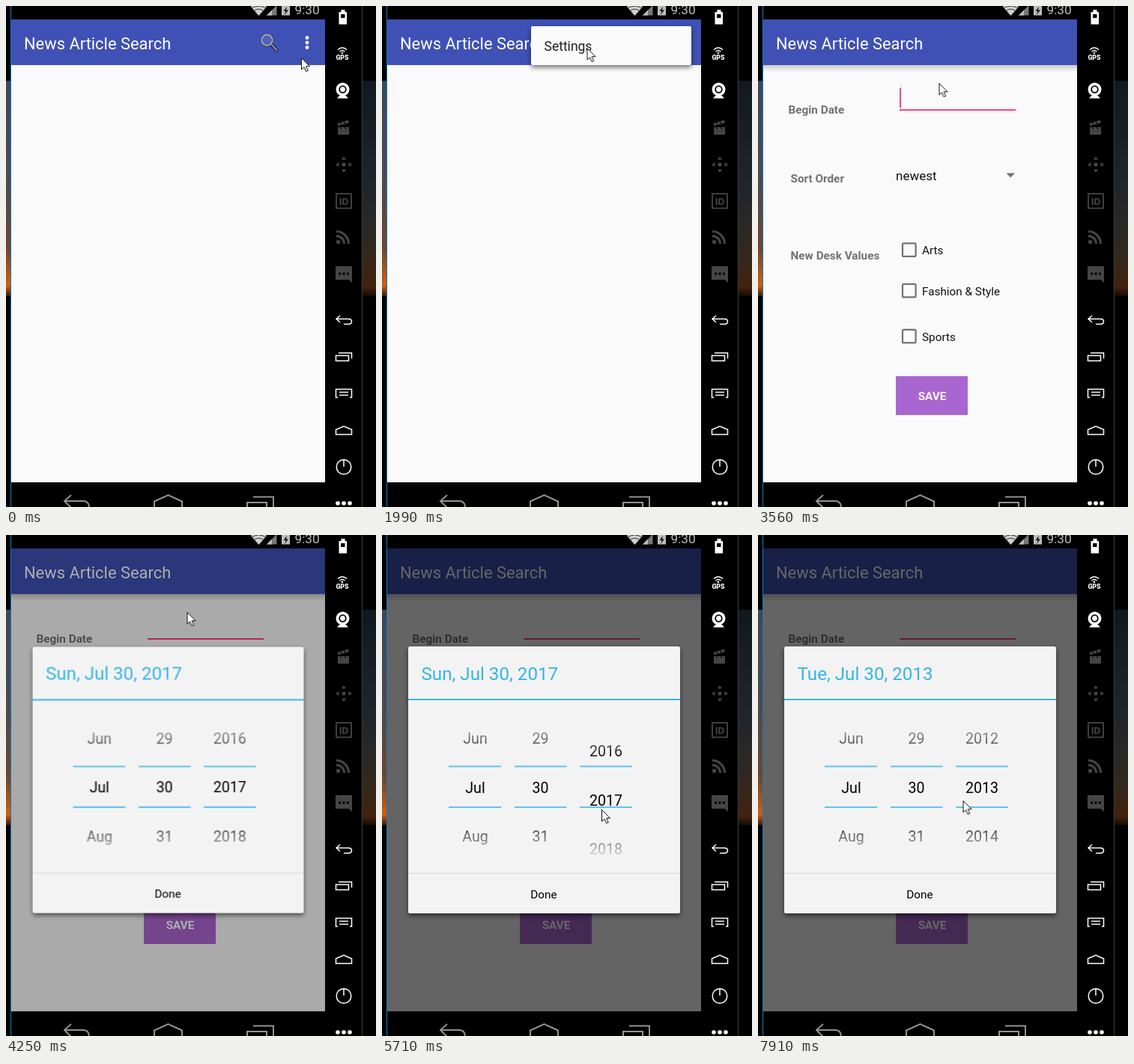
An HTML page that plays this animation: 494x670 px, repeating every 8 s.

```html
<!DOCTYPE html>
<html lang="en">
<head>
<meta charset="utf-8">
<title>News Article Search</title>
<style>
html, body { margin: 0; width: 100%; height: 100%; overflow: hidden; background: #000; }
svg { display: block; width: 100%; height: 100%; font-family: Roboto, sans-serif; }
.mid { text-anchor: middle; }
.label { font-size: 15.3px; font-weight: 700; fill: #737373; }
.option { font-size: 15.3px; fill: #111; }
.wheel { font-size: 19.6px; text-anchor: middle; }
.line { fill: none; stroke: #fff; stroke-width: 1.5; }
.nav { fill: none; stroke: #929292; stroke-width: 2; }

/* Screen capture: every pose is held until the next one */
.anim { animation: 8s step-end infinite; }
#cursor { animation-name: cursor; }
#ripple { animation-name: ripple; opacity: 0; }
#menu { animation-name: menu; opacity: 0; transform-origin: 413px 27px; }
#press { animation-name: press; opacity: 0; }
#shade { animation-name: shade; opacity: 0; }
#form { animation-name: form; opacity: 0; transform-origin: 216px 318px; }
#caret { animation-name: caret; }
#dim { animation-name: dim; opacity: 0; }
#dialog { animation-name: dialog; opacity: 0; transform-origin: 216px 327.5px; }
#years { animation-name: years; }
#date { animation-name: date; }

@keyframes cursor {
  0% { transform: translate(394px, 69px); }
  1.5% { transform: translate(395px, 67px); }
  3.32% { transform: translate(396px, 65px); }
  19.5% { transform: translate(365px, 64px); }
  21.3% { transform: translate(325px, 60px); }
  23.1% { transform: translate(290px, 57px); }
  24.87% { transform: translate(273.5px, 56px); }
  39.5% { transform: translate(262px, 70px); }
  41.25% { transform: translate(246px, 84px); }
  43% { transform: translate(243px, 95px); }
  44.5% { transform: translate(241.5px, 103px); }
  58.6% { transform: translate(236px, 125px); }
  60.4% { transform: translate(230px, 170px); }
  62.1% { transform: translate(245px, 235px); }
  63.9% { transform: translate(270px, 285px); }
  65.6% { transform: translate(282px, 307px); }
  69.5% { transform: translate(287px, 338px); }
  71.37% { transform: translate(293px, 367px); }
  72.87% { transform: translate(296px, 395px); }
  74.6% { transform: translate(297px, 403px); }
  78% { transform: translate(296px, 385px); }
  79.7% { transform: translate(292px, 350px); }
  81.37% { transform: translate(285px, 310px); }
  84.87% { transform: translate(286px, 322px); }
  86.65% { transform: translate(290px, 360px); }
  88.4% { transform: translate(293px, 400px); }
  90.15% { transform: translate(294px, 408px); }
  93.7% { transform: translate(292px, 385px); }
  95.5% { transform: translate(289px, 358px); }
  97.25% { transform: translate(286px, 338px); }
  98.87%, 100% { transform: translate(273.5px, 355px); }
}
@keyframes ripple {
  0% { opacity: 0; }
  5.14% { opacity: .12; }
  6.96% { opacity: .22; }
  12.4% { opacity: .1; }
  14.25%, 100% { opacity: 0; }
}
@keyframes menu {
  0% { opacity: 0; transform: scale(.8); }
  10.6% { opacity: .35; transform: scale(.93); }
  12.4% { opacity: .8; transform: scale(.98); }
  14.25% { opacity: 1; transform: none; }
  30.5% { opacity: .4; transform: none; }
  32.5%, 100% { opacity: 0; }
}
@keyframes press {
  0% { opacity: 0; }
  28.75% { opacity: .1; }
  32.5%, 100% { opacity: 0; }
}
@keyframes shade {
  0% { opacity: 0; }
  30.5% { opacity: .03; }
  32.5% { opacity: .07; }
  34.2%, 100% { opacity: .12; }
}
@keyframes form {
  0% { opacity: 0; transform: scale(.85); }
  30.5% { opacity: .1; transform: scale(.855); }
  32.5% { opacity: .42; transform: scale(.884); }
  34.25% { opacity: .8; transform: scale(.95); }
  35.9% { opacity: 1; transform: scale(.988); }
  37.6%, 100% { opacity: 1; transform: none; }
}
@keyframes caret {
  0% { opacity: 1; }
  39.5% { opacity: 0; }
  43% { opacity: 1; }
  53.12%, 100% { opacity: 0; }
}
@keyframes dim {
  0% { opacity: 0; }
  53.12% { opacity: .32; }
  55%, 100% { opacity: .6; }
}
@keyframes dialog {
  0% { opacity: 0; transform: scale(.997); }
  53.12% { opacity: 1; transform: scale(.997); }
  55%, 100% { opacity: 1; transform: none; }
}
@keyframes years {
  0% { transform: none; }
  71.37% { transform: translateY(17px); }
  72.87% { transform: translateY(45px); }
  74.6% { transform: translateY(58px); }
  76.3% { transform: translateY(63px); }
  78% { transform: translateY(65.5px); }
  86.65% { transform: translateY(95px); }
  88.4% { transform: translateY(150px); }
  90.15% { transform: translateY(195px); }
  91.9% { transform: translateY(232px); }
  93.7% { transform: translateY(252px); }
  95.5% { transform: translateY(260px); }
  97.25%, 100% { transform: translateY(262px); }
}
@keyframes date {
  0% { transform: none; }
  72.87% { transform: translateY(-40px); }
  88.4% { transform: translateY(-80px); }
  90.15% { transform: translateY(-120px); }
  91.9%, 100% { transform: translateY(-160px); }
}
</style>
</head>
<body>
<svg viewBox="0 0 494 670">
  <defs>
    <linearGradient id="skyLeft" x2="0" y2="1">
      <stop stop-color="#3b475c"/><stop offset=".45" stop-color="#4a4a50"/>
      <stop offset=".78" stop-color="#6b4630"/><stop offset=".95" stop-color="#d0600f"/>
      <stop offset="1" stop-color="#3a1c08"/>
    </linearGradient>
    <linearGradient id="skyRight" x2="0" y2="1">
      <stop stop-color="#101820"/><stop offset=".5" stop-color="#1f262d"/>
      <stop offset=".8" stop-color="#33291f"/><stop offset=".96" stop-color="#42220f"/>
      <stop offset="1" stop-color="#140a05"/>
    </linearGradient>
    <linearGradient id="barShadow" x2="0" y2="1">
      <stop stop-opacity=".2"/><stop offset="1" stop-opacity=".01"/>
    </linearGradient>
    <linearGradient id="fade" gradientUnits="userSpaceOnUse" x1="0" x2="0" y1="240" y2="436">
      <stop stop-color="#000"/><stop offset=".306" stop-color="#fff"/>
      <stop offset=".694" stop-color="#fff"/><stop offset="1" stop-color="#000"/>
    </linearGradient>
    <mask id="wheelMask" maskUnits="userSpaceOnUse" x="40" y="236" width="350" height="204" style="color-interpolation:sRGB;mask-type:luminance">
      <rect x="40" y="240" width="350" height="196" fill="url(#fade)"/>
    </mask>
    <clipPath id="dateClip"><rect x="45" y="168" width="340" height="38"/></clipPath>
    <clipPath id="screenClip"><rect x="7" y="18" width="419" height="619"/></clipPath>
    <filter id="shadow" x="-10%" y="-20%" width="120%" height="150%">
      <feDropShadow dx="0" dy="3" stdDeviation="3" flood-opacity=".55"/>
    </filter>
    <g id="bar">
      <rect x="7" y="18" width="419" height="61" fill="#3f51b5"/>
      <text x="24" y="57.5" font-size="21.9" fill="#fff">News Article Search</text>
    </g>
    <rect id="box" x="193" y="-8.7" width="17.6" height="17.6" rx="1.5" fill="none" stroke="#737373" stroke-width="2.2"/>
  </defs>

  <!-- Desktop and emulator frame -->
  <rect width="494" height="670"/>
  <rect y="100" width="6" height="288" fill="url(#skyLeft)"/>
  <rect x="476" y="100" width="18" height="288" fill="url(#skyRight)"/>
  <path d="M6.5 0V670" stroke="#1b78c4"/>
  <path d="M475.5 0V670" stroke="#3c3c3c"/>

  <!-- Status bar -->
  <g fill="#bdbdbd">
    <path d="M327 1Q337.500-6 348 1L337.500 13Z" fill="#d0d0d0"/>
    <path d="M328 3Q337.500-3 347 3M331 6.500Q337.500 2 344 6.500" fill="none" stroke="#333"/>
    <path d="M348 12.500 361.500-1V12.500Z" fill="#777"/>
    <path d="M348 12.500 355 5.500V12.500Z"/>
    <path d="M368 0H379V12.500H368Z"/>
    <path d="M375 1 370.500 7H373.500L372 12 377 5.500H374Z" fill="#111"/>
    <text x="385.500" y="11" font-size="17.200">9:30</text>
  </g>

  <!-- Phone navigation -->
  <g class="nav">
    <path d="M87 654 78 662 87 671M78 662H103Q111 662 111 671"/>
    <path d="M198 671V662.500L216.500 654 235 662.500V671"/>
    <path d="M322 671V664H348V671M330 656.500H357V671"/>
  </g>

  <!-- Emulator toolbar -->
  <g fill="#fff">
    <path d="M447.500 5H452.500V8H455V24.500H444.500V8H447.500Z"/>
    <path d="M447 11H452.500V16H447Z" fill="#000"/>
    <path class="line" d="M443 58.500Q449 53 455 58.500M445.500 61Q449 58 452.500 61"/>
    <circle cx="449" cy="62.800" r="1.300"/>
    <text class="mid" x="449" y="72" font-size="8.800" font-weight="900">GPS</text>
    <circle cx="449.500" cy="111.500" r="9"/>
    <circle cx="449.500" cy="111.500" r="4.300" fill="none" stroke="#000" stroke-width="1.800"/>
    <path d="M445 120H454L457 123.500H442Z"/>
    <circle cx="443" cy="665" r="2.800"/>
    <circle cx="451" cy="665" r="2.800"/>
    <circle cx="459" cy="665" r="2.800"/>
  </g>
  <g fill="#454545">
    <path d="M443 162H458V172H443ZM442.500 157 457 152.500 458 156 443.500 160.500Z"/>
    <path d="M446 155 448 159M451 153.500 453 157.500M446 162 448 165M452 162 454 165" stroke="#000"/>
    <circle cx="451" cy="212" r="2.600"/>
    <path d="M451 201 454 205.500H448ZM451 223 448 218.500H454ZM440 212 444.500 209V215ZM462 212 457.500 215V209Z"/>
    <rect x="441" y="251" width="20" height="19.500" fill="none" stroke="#454545" stroke-width="1.800"/>
    <text class="mid" x="451" y="266" font-size="13.500" font-weight="700">ID</text>
    <circle cx="443.500" cy="315.500" r="2.700"/>
    <path d="M441 307.500A10.500 10.500 0 0 1 451.500 318M441 301.500A16.500 16.500 0 0 1 457.500 318" fill="none" stroke="#454545" stroke-width="3.200"/>
    <path d="M440 348H462V370L457.500 366H440Z"/>
    <path d="M444 356.500H447V359.500H444ZM449.500 356.500H452.500V359.500H449.500ZM455 356.500H458V359.500H455Z" fill="#000"/>
  </g>
  <g class="line">
    <path d="M446 414 441 418.500 446 423M441 418.500H457Q461.500 418.500 461.500 422 461.500 425.500 457 425.500H451"/>
    <path d="M440.500 467.500H457.500V474.500H440.500ZM444 464H461.500V471.500"/>
    <path d="M443 523.500H440.500V512.500H461.500V523.500H459M445 516.500H457M445 520.500H457"/>
    <path d="M440.500 573V566.500L451 562 461.500 566.500V573Z"/>
    <circle cx="451" cy="616.500" r="9.800"/><path d="M451 606V616"/>
  </g>

  <g clip-path="url(#screenClip)">
    <!-- Main screen -->
    <rect x="7" y="18" width="419" height="619" fill="#fafafa"/>
    <use href="#bar"/>
    <g fill="none">
      <path d="M354.500 51.500 361.500 59" stroke="#252b55" stroke-width="5" stroke-linecap="round"/>
      <circle cx="348.500" cy="45.500" r="7.300" stroke="#303766" stroke-width="3.600"/>
      <circle cx="348.500" cy="45.500" r="7.300" fill="#5262b4" stroke="#a3a7bc" stroke-width="1.900"/>
      <path d="M354.500 51.500 361.500 59" stroke="#80859e" stroke-width="2.400" stroke-linecap="round"/>
    </g>
    <g fill="#fff">
      <circle cx="402" cy="42.500" r="2.400"/>
      <circle cx="402" cy="49" r="2.400"/>
      <circle cx="402" cy="55.500" r="2.400"/>
    </g>
    <circle id="ripple" class="anim" cx="402" cy="49" r="26" fill="#fff"/>
    <g id="menu" class="anim">
      <rect x="199" y="27" width="214" height="52" rx="2" fill="#fafafa" filter="url(#shadow)"/>
      <rect id="press" class="anim" x="199" y="27" width="214" height="52"/>
      <text x="216.500" y="60" font-size="17.500" fill="#212121">Settings</text>
    </g>
    <rect id="shade" class="anim" x="7" y="18" width="419" height="619"/>

    <!-- Settings screen -->
    <g id="form" class="anim">
      <rect x="7" y="79" width="419" height="558" fill="#fafafa"/>
      <rect x="7" y="79" width="419" height="9" fill="url(#barShadow)"/>
      <use href="#bar"/>
      <g class="label">
        <text x="40.500" y="144">Begin Date</text>
        <text x="43.500" y="235.500">Sort Order</text>
        <text x="43.500" y="339">New Desk Values</text>
      </g>
      <path d="M189 139H344" stroke="#ff4081" stroke-width="2.200"/>
      <path id="caret" class="anim" d="M190 109.500V136" stroke="#ff4081" stroke-width="2"/>
      <text x="184" y="232.500" font-size="17" fill="#111">newest</text>
      <path d="M331.500 223.500H343L337.250 229.500Z" fill="#737373"/>
      <use href="#box" y="326"/>
      <use href="#box" y="380.500"/>
      <use href="#box" y="441.500"/>
      <g class="option">
        <text x="219" y="332">Arts</text>
        <text x="219" y="386.500">Fashion &amp; Style</text>
        <text x="219" y="447.500">Sports</text>
      </g>
      <rect x="184" y="495" width="96" height="52" fill="#aa66d0"/>
      <text class="mid" x="232.500" y="527" font-size="15.300" font-weight="700" fill="#fff">SAVE</text>
    </g>
    <rect id="dim" class="anim" x="7" y="18" width="419" height="619"/>

    <!-- Date picker -->
    <g id="dialog" class="anim">
      <rect x="35" y="149" width="363" height="357" rx="2.500" fill="#f3f3f3" filter="url(#shadow)"/>
      <g clip-path="url(#dateClip)">
        <g id="date" class="anim" font-size="24.200" fill="#33b5e5">
          <text x="52.500" y="193.500">Sun, Jul 30, 2017</text>
          <text x="52.500" y="233.500">Sat, Jul 30, 2016</text>
          <text x="52.500" y="273.500">Thu, Jul 30, 2015</text>
          <text x="52.500" y="313.500">Wed, Jul 30, 2014</text>
          <text x="52.500" y="353.500">Tue, Jul 30, 2013</text>
        </g>
      </g>
      <path d="M35 220H398" stroke="#3db4e2" stroke-width="2.200"/>
      <g class="wheel" mask="url(#wheelMask)">
        <text x="124.500" y="279">Jun</text>
        <text x="124.500" y="344.500">Jul</text>
        <text x="124.500" y="410">Aug</text>
        <text x="211.500" y="279">29</text>
        <text x="211.500" y="344.500">30</text>
        <text x="211.500" y="410">31</text>
        <g id="years" class="anim">
          <text x="299" y="17">2012</text>
          <text x="299" y="82.500">2013</text>
          <text x="299" y="148">2014</text>
          <text x="299" y="213.500">2015</text>
          <text x="299" y="279">2016</text>
          <text x="299" y="344.500">2017</text>
          <text x="299" y="410">2018</text>
        </g>
      </g>
      <path d="M89 309.500H159M177 309.500H246.500M264 309.500H334M89 364H159M177 364H246.500M264 364H334" stroke="#62c3e8" stroke-width="2.200"/>
      <path d="M35 452.500H398" stroke="#d6d6d6"/>
      <text class="mid" x="216" y="485.500" font-size="15.300">Done</text>
    </g>
  </g>

  <path id="cursor" class="anim" d="M.5.5V16L4 12.700 6.600 18.500 9.200 17.400 6.700 11.700H11.500Z" fill="#fff" stroke="#111"/>
</svg>
</body>
</html>
```
